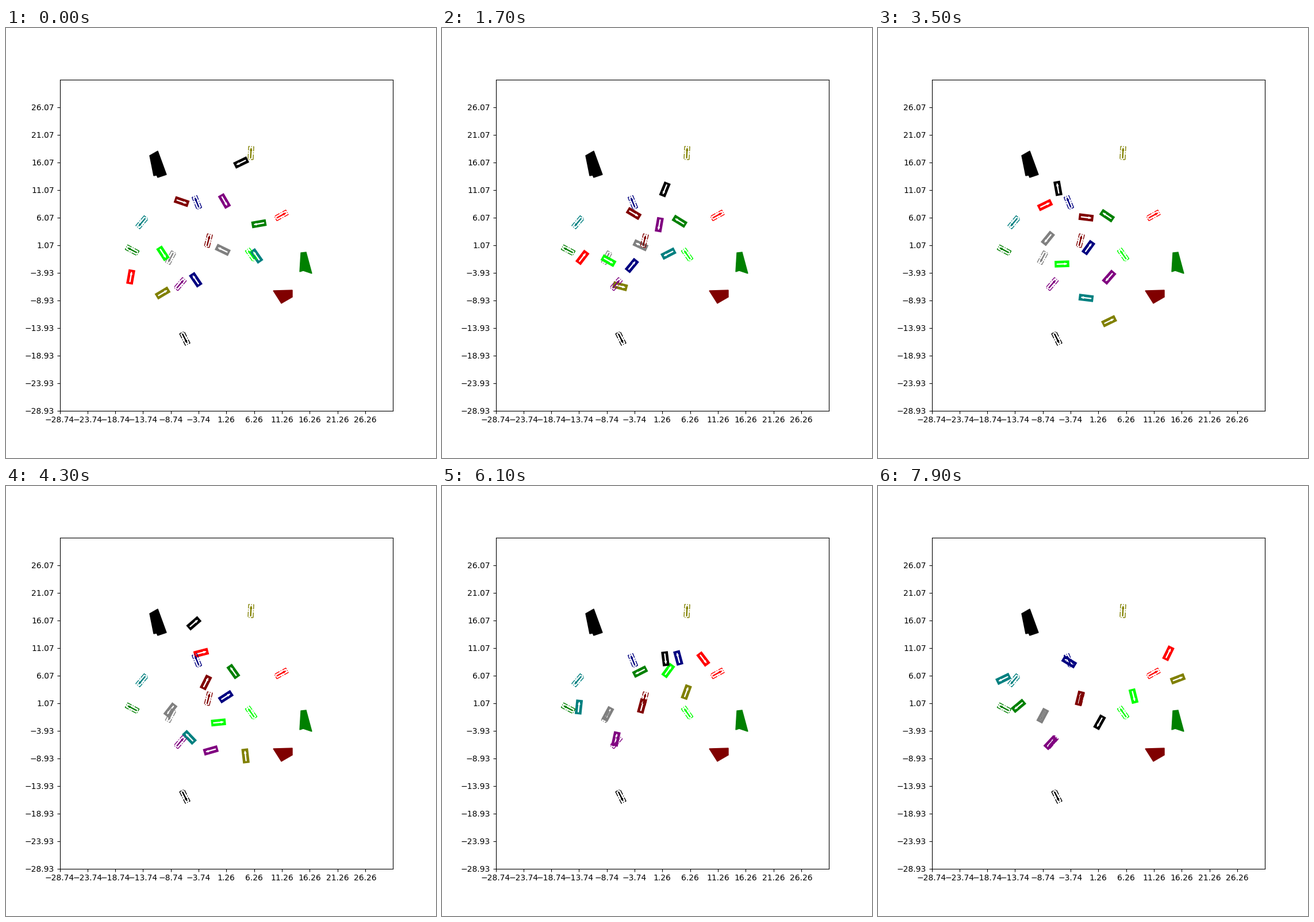
A matplotlib script for the animation above (8000 ms loop, 748 px wide and 748 px high).

```python
import math

import matplotlib.pyplot as plt
import numpy as np
from matplotlib.animation import FuncAnimation
from matplotlib.patches import Polygon

SIZE, DPI = 748, 100
X0, Y0, SPAN = -28.74, -28.93, 60
LENGTH, WIDTH = 2.35, 0.92
FRAMES, INTERVAL = 80, 100
STEPS = (0, 9, 23, 34, 49, 60, 78)

fig = plt.figure(figsize=(SIZE / DPI, SIZE / DPI), dpi=DPI)
ax = fig.add_subplot()
ax.set_xlim(X0, X0 + SPAN)
ax.set_ylim(Y0, Y0 + SPAN)
ax.set_xticks(X0 + np.arange(0, SPAN, 5))
ax.set_yticks(Y0 + np.arange(0, SPAN, 5))
ax.xaxis.set_major_formatter("{x:.2f}")
ax.yaxis.set_major_formatter("{x:.2f}")
for axis in (ax.xaxis, ax.yaxis):
    axis.set_major_formatter(lambda v, _: f"{v:.2f}".replace("-", "\u2212"))

BODY = np.array([(-1, -1), (1, -1), (1, 1), (-1, 1)]) * (LENGTH / 2, WIDTH / 2)
ARROW = np.array([(-0.9, -0.05), (0.45, -0.05), (0.45, -0.15), (0.9, 0),
                  (0.45, 0.15), (0.45, 0.05), (-0.9, 0.05)])


def to_data(points):
    """Stage pixels (y down) to axes units."""
    p = np.asarray(points, float)
    x = X0 + SPAN * (p[..., 0] / SIZE - 0.125) / 0.775
    y = Y0 + SPAN * (0.89 - p[..., 1] / SIZE) / 0.77
    return np.stack([x, y], axis=-1)


def unit(deg):
    a = math.radians(deg)
    return np.array([math.cos(a), math.sin(a)])


def place(shape, pos, deg):
    c, s = unit(deg)
    return shape @ np.array([[c, s], [-s, c]]) + pos


def add(points, **style):
    return ax.add_patch(Polygon(points, closed=True, **style))


def drive(path, steps):
    """Pose at every step: Hermite curve whose tangents follow the headings."""
    pos = to_data([p[:2] for p in path])
    head = [p[2] for p in path]
    pace = []
    for i in range(len(path) - 1):
        chord = pos[i + 1] - pos[i]
        half = math.radians(abs(head[i + 1] - head[i]) / 2)
        bend = half / math.sin(half) if half > 1e-6 else 1
        way = math.copysign(1, chord @ unit((head[i] + head[i + 1]) / 2))
        pace.append(way * np.hypot(*chord) * bend / (steps[i + 1] - steps[i]))
    speed = [0.0]
    for a, b in zip(pace, pace[1:]):
        speed.append(math.copysign(math.sqrt(a * b), a) if a * b > 0 else 0.0)
    speed.append(pace[-1])

    poses = []
    for i in range(len(path) - 1):
        n = steps[i + 1] - steps[i]
        m0 = unit(head[i]) * speed[i] * n
        m1 = unit(head[i + 1]) * speed[i + 1] * n
        d = pos[i + 1] - pos[i]
        for k in range(n):
            t = k / n
            p = (pos[i] + d * t * t * (3 - 2 * t)
                 + m0 * t * (1 - t) ** 2 + m1 * t * t * (t - 1))
            v = (6 * d * t * (1 - t) + m0 * (1 - t) * (1 - 3 * t)
                 + m1 * t * (3 * t - 2))
            if speed[i] * speed[i + 1] > 0:
                v = v * math.copysign(1, speed[i])
                deg = math.degrees(math.atan2(v[1], v[0]))
            else:
                deg = head[i] + (head[i + 1] - head[i]) * t
            poses.append((p, deg))
    poses.append((pos[-1], head[-1]))
    return poses


class Car:
    def __init__(self, color, goal, path, steps=STEPS):
        self.poses = drive(path, steps)
        self.body = add(BODY, fc=color, ec=color, lw=2)
        self.arrow = add(ARROW, fc="white", ec="white", lw=1)
        spot, deg = to_data(goal[:2]), goal[2]
        add(place(BODY, spot, deg), fill=False, ec=color, lw=1, ls="-.")
        add(place(ARROW, spot, deg), fc=color, ec=color, lw=1)

    def show(self, step):
        pos, deg = self.poses[step]
        self.body.set_xy(place(BODY, pos, deg))
        self.arrow.set_xy(place(ARROW, pos, deg))


OBSTACLES = {
    "black": [(250, 222), (264, 214), (279, 255), (264, 260), (262, 256), (257, 257)],
    "green": [(513, 391), (522, 390), (532, 427), (517, 422), (511, 424)],
    "maroon": [(465, 457), (498, 456), (498, 468), (479, 479)],
}
for color, outline in OBSTACLES.items():
    add(to_data(outline), fc=color, ec=color, lw=1)

# Each pose is (x, y, heading in degrees).
cars = [
    Car("red", (479, 326, 29),
        [(217, 433, 80), (226, 419, 38), (264.5, 370, 57), (290.5, 308, 26),
         (385.5, 282, 6), (454.5, 301, -53), (505, 291, 64)]),
    Car("green", (219.5, 386.5, 152),
        [(440, 340.5, 190), (424, 341, 167), (405, 331, 153), (398.5, 326.5, 146),
         (389, 317.5, 150), (344.5, 323, 207), (244.5, 382.5, 220)]),
    Car("gray", (286.5, 399.5, 242),
        [(377, 386, 154), (361.5, 382.5, 177), (328.5, 367.5, 142), (295.5, 366, 231),
         (284, 402, 233), (288.5, 396.5, 242), (286.5, 399.5, 242)]),
    Car("teal", (236.5, 338, 230),
        [(435.5, 396.5, 125), (421.5, 387.5, 167), (379, 417, 279), (362, 469.5, 173),
         (281.5, 417, 190), (238, 384.5, 84), (218, 335.5, 206)]),
    Car("lime", (426.5, 394.5, 125),
        [(273, 392, -57), (283.5, 401, -28), (297, 407, -8), (320, 410.5, 2),
         (398.5, 390, 91), (393.5, 321, 54), (444.5, 365.5, -76)]),
    Car("maroon", (352, 370, 76),
        [(305.5, 302, -19), (319, 312, -42), (348.5, 328, 4), (362, 329.5, -7),
         (341.5, 359.5, 125), (348, 382.5, 75), (351, 369.5, 76)]),
    Car("navy", (332, 303.5, 112),
        [(330, 438, 124), (326, 423.5, 80), (341.5, 406.5, 16), (366, 382, 54),
         (403.5, 355.5, 25), (411, 299, 105), (384, 265.5, 180), (332.5, 306, 149)],
        STEPS[:6] + (67, 78)),
    Car("olive", (426, 217.5, 87),
        [(272.5, 461, 31), (284.5, 450, 36), (345, 463, -26), (402, 510, 26),
         (412, 423.5, 85), (425, 358.5, 70), (521.5, 335.5, 21)]),
    Car("purple", (303, 445.5, 49.5),
        [(380, 301, -60), (384, 316, -95), (383, 373.5, -55), (402, 433.5, -131),
         (317.5, 462.5, -197), (302.5, 440, -282), (300.5, 446.5, -313)]),
    Car("black", (311, 540, -63.5),
        [(409, 234, 206), (398, 246.5, 250), (363, 302, 171), (313, 279, 100),
         (341, 232, 10), (358, 243, -59), (388.5, 300.5, -83), (385.5, 411, -119)],
        STEPS[:4] + (45,) + STEPS[4:]),
]


def draw(frame):
    for car in cars:
        car.show(max(frame - 1, 0))
    return []


anim = FuncAnimation(fig, draw, frames=FRAMES, interval=INTERVAL, repeat=True)
plt.show()
```
